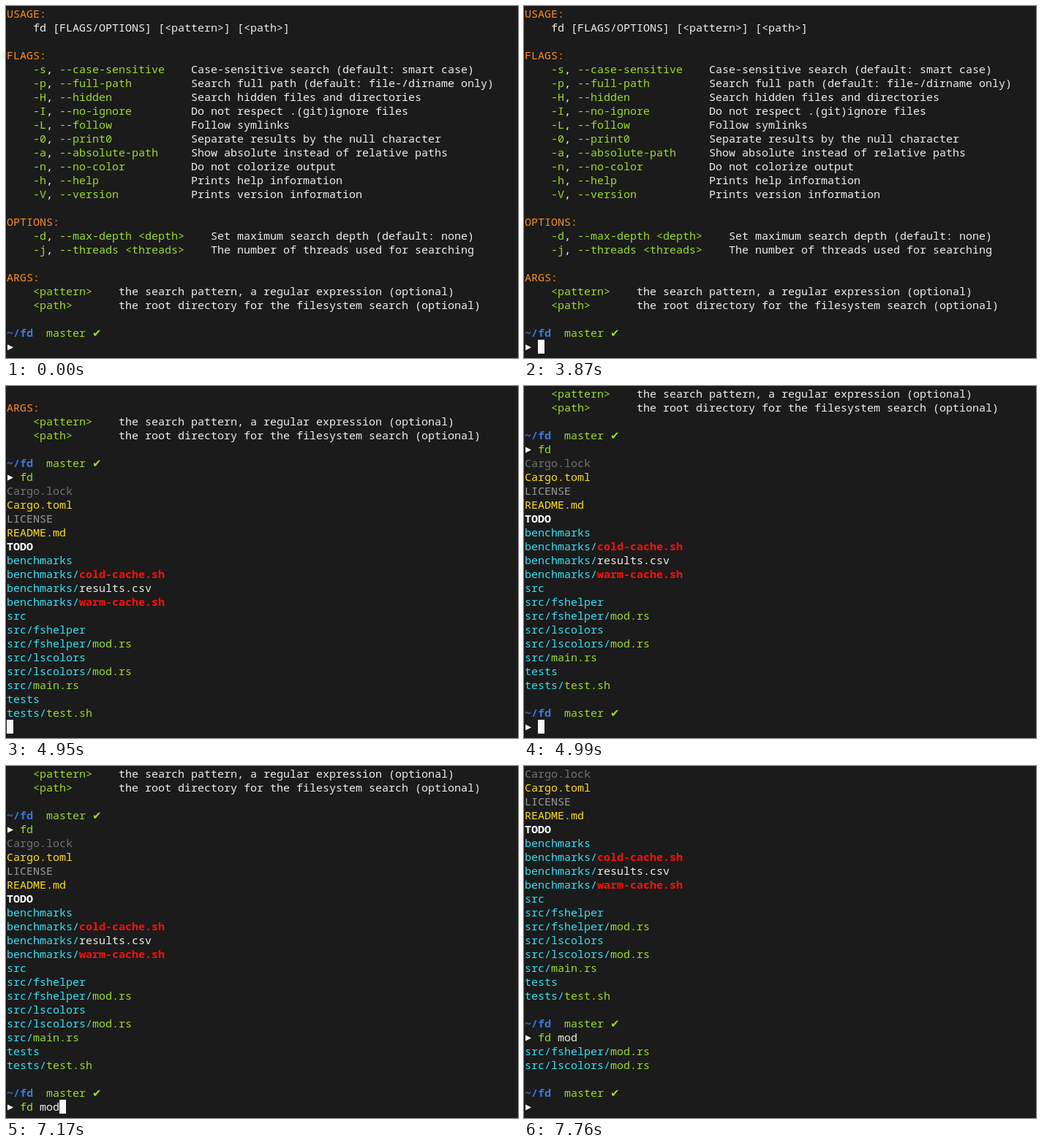
An HTML page that plays this animation: 700 by 482 pixels, repeating every 8000 ms.

```html
<!DOCTYPE html>
<html lang="en">
<head>
<meta charset="utf-8">
<title>fd in a terminal</title>
<style>
  :root { --row: 19px; --col: 9px; --loop: 8s step-end infinite; }
  html, body { margin: 0; width: 100%; height: 100%; overflow: hidden; background: #1b1b1b; }
  #term {
    position: absolute; left: 1px; top: 1px; width: 699px; height: 475px; overflow: hidden;
    color: #eeeeec;
    font: 15px/19px "Noto Sans Mono", "DejaVu Sans Mono", monospace;
    font-variant-ligatures: none;
  }
  pre { margin: 0; font: inherit; animation: scroll var(--loop); }
  .o { color: #fa8c1e; }
  .g { color: #9adc28; }
  .c { color: #34e2f6; }
  .y { color: #fcdc1a; }
  .r { color: #ff0f0a; font-weight: bold; }
  .b { color: #3c78dc; font-weight: bold; }
  .w { color: #fff; font-weight: bold; }
  .d1 { color: #737373; }
  .d2 { color: #9a9a9a; }
  /* zero line height keeps the fallback font from growing its row */
  .tick { color: #9adc28; font-family: "DejaVu Sans", sans-serif; line-height: 0; }
  .arrow, .typed { display: inline-block; height: var(--row); vertical-align: top; }
  .arrow {
    width: var(--col); background: #fff;
    clip-path: polygon(1px 6.5px, 9px 10.5px, 1px 14.5px);
  }
  .typed { width: 0; overflow: hidden; }
  #first { animation: type-first var(--loop); }
  #second { animation: type-second var(--loop); }
  #cursor {
    position: absolute; left: 0; top: calc(24 * var(--row));
    width: var(--col); height: var(--row); background: #f8f8f8;
    animation: move var(--loop), blink var(--loop);
  }

  @keyframes scroll {
    0% { transform: none; }
    61.875% { transform: translateY(calc(-18 * var(--row))); }
    62.375% { transform: translateY(calc(-20 * var(--row))); }
    90.125% { transform: translateY(calc(-23 * var(--row))); }
    90.625%, 100% { transform: translateY(calc(-25 * var(--row))); }
  }
  @keyframes type-first {
    0% { width: 0; }
    59.625% { width: var(--col); }
    60.375%, 100% { width: calc(2 * var(--col)); }
  }
  @keyframes type-second {
    0% { width: 0; }
    72.875% { width: var(--col); }
    73.5% { width: calc(2 * var(--col)); }
    74.5% { width: calc(3 * var(--col)); }
    77.125% { width: calc(4 * var(--col)); }
    78.25% { width: calc(5 * var(--col)); }
    79.375%, 100% { width: calc(6 * var(--col)); }
  }
  @keyframes move {
    0%, 62.375%, 90.625%, 100% { left: calc(2 * var(--col)); }
    59.625%, 72.875% { left: calc(3 * var(--col)); }
    60.375%, 73.5% { left: calc(4 * var(--col)); }
    74.5% { left: calc(5 * var(--col)); }
    77.125% { left: calc(6 * var(--col)); }
    78.25% { left: calc(7 * var(--col)); }
    79.375% { left: calc(8 * var(--col)); }
    61.875%, 90.125% { left: 0; }
  }
  @keyframes blink {
    0%, 10.875%, 25.875%, 40.875%, 55.875%, 68.875%, 86.5%, 97%, 100% { opacity: 0; }
    3.375%, 18.375%, 33.375%, 48.375%, 59.125%, 72.375%, 89.625% { opacity: 1; }
  }
</style>
</head>
<body>
<div id="term">
<pre>
<span class="o">USAGE:</span>
    fd [FLAGS/OPTIONS] [&lt;pattern&gt;] [&lt;path&gt;]

<span class="o">FLAGS:</span>
    <span class="g">-s</span>, <span class="g">--case-sensitive</span>    Case-sensitive search (default: smart case)
    <span class="g">-p</span>, <span class="g">--full-path</span>         Search full path (default: file-/dirname only)
    <span class="g">-H</span>, <span class="g">--hidden</span>            Search hidden files and directories
    <span class="g">-I</span>, <span class="g">--no-ignore</span>         Do not respect .(git)ignore files
    <span class="g">-L</span>, <span class="g">--follow</span>            Follow symlinks
    <span class="g">-0</span>, <span class="g">--print0</span>            Separate results by the null character
    <span class="g">-a</span>, <span class="g">--absolute-path</span>     Show absolute instead of relative paths
    <span class="g">-n</span>, <span class="g">--no-color</span>          Do not colorize output
    <span class="g">-h</span>, <span class="g">--help</span>              Prints help information
    <span class="g">-V</span>, <span class="g">--version</span>           Prints version information

<span class="o">OPTIONS:</span>
    <span class="g">-d</span>, <span class="g">--max-depth &lt;depth&gt;</span>    Set maximum search depth (default: none)
    <span class="g">-j</span>, <span class="g">--threads &lt;threads&gt;</span>    The number of threads used for searching

<span class="o">ARGS:</span>
    <span class="g">&lt;pattern&gt;</span>    the search pattern, a regular expression (optional)
    <span class="g">&lt;path&gt;</span>       the root directory for the filesystem search (optional)

<span class="b">~/fd</span>  <span class="g">master</span> <span class="tick">✔</span>
<span class="arrow"></span> <span class="typed g" id="first">fd</span>
<span class="d1">Cargo.lock</span>
<span class="y">Cargo.toml</span>
<span class="d2">LICENSE</span>
<span class="y">README.md</span>
<span class="w">TODO</span>
<span class="c">benchmarks</span>
<span class="c">benchmarks/</span><span class="r">cold-cache.sh</span>
<span class="c">benchmarks/</span>results.csv
<span class="c">benchmarks/</span><span class="r">warm-cache.sh</span>
<span class="c">src</span>
<span class="c">src/fshelper</span>
<span class="c">src/fshelper/</span><span class="g">mod.rs</span>
<span class="c">src/lscolors</span>
<span class="c">src/lscolors/</span><span class="g">mod.rs</span>
<span class="c">src/</span><span class="g">main.rs</span>
<span class="c">tests</span>
<span class="c">tests/</span><span class="g">test.sh</span>

<span class="b">~/fd</span>  <span class="g">master</span> <span class="tick">✔</span>
<span class="arrow"></span> <span class="typed" id="second"><span class="g">fd</span> mod</span>
<span class="c">src/fshelper/</span><span class="g">mod.rs</span>
<span class="c">src/lscolors/</span><span class="g">mod.rs</span>

<span class="b">~/fd</span>  <span class="g">master</span> <span class="tick">✔</span>
<span class="arrow"></span>
</pre>
<div id="cursor"></div>
</div>
</body>
</html>
```
